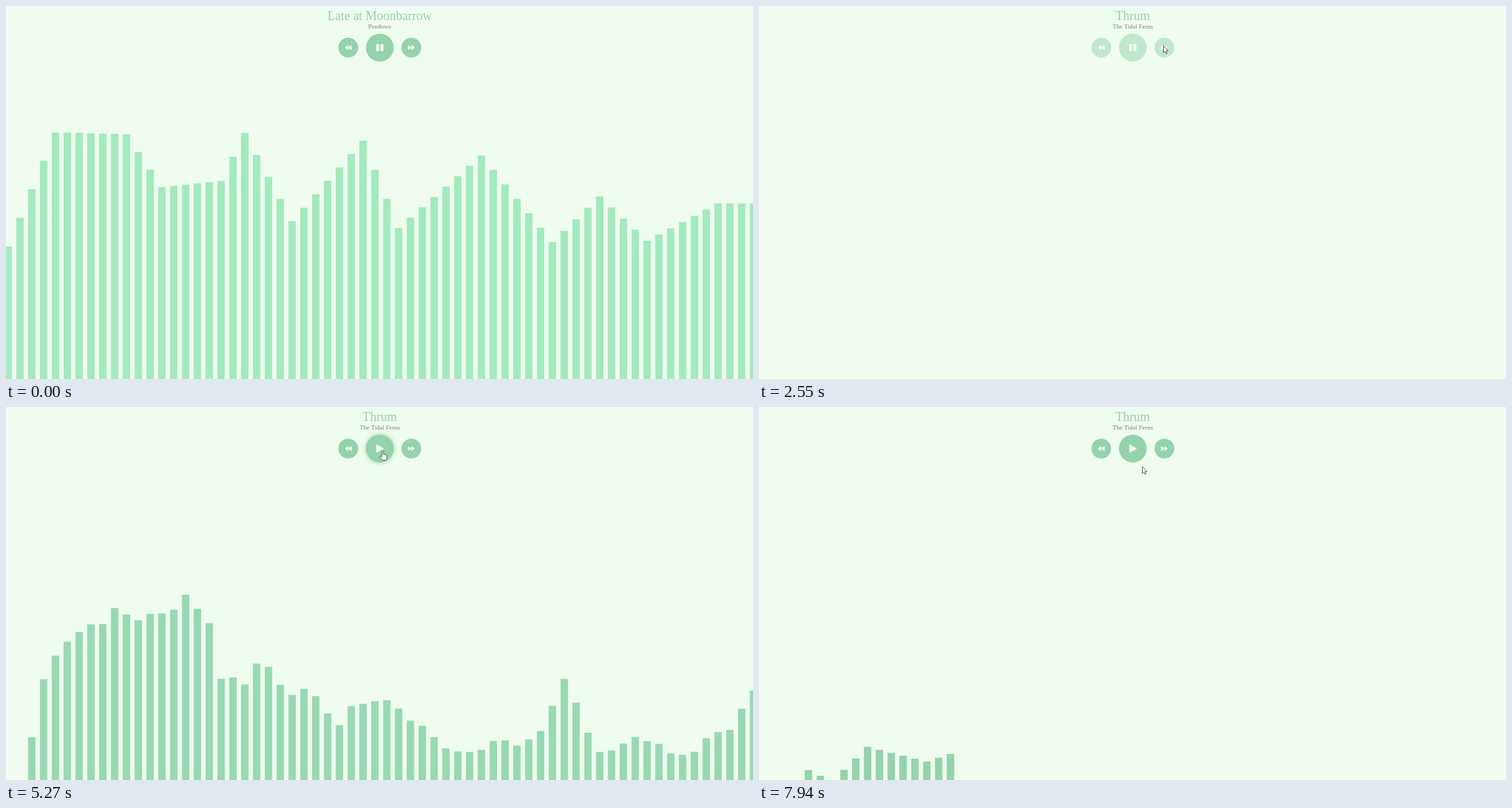
Recreate the animation shown at these times as an HTML page with a canvas. Size 1059 by 529 pixels, loop 8 s.

```html
<!DOCTYPE html>
<html lang="en">
<head>
<meta charset="utf-8">
<title>Music visualizer</title>
<style>
  html, body { margin: 0; width: 100%; height: 100%; overflow: hidden; background: #effcef; }
  canvas { display: block; width: 1059px; height: 529px; }
</style>
</head>
<body>
<canvas id="stage" width="1059" height="529"></canvas>
<script>
const W = 1059, H = 529, LOOP = 8000, BUTTON_Y = 59;
const PAPER = '#effcef', GREEN = '#94d3ac', INK = '#655c56';
const ctx = document.getElementById('stage').getContext('2d');

// Bursts of picture updates: first and last update in ms
const BURSTS = [[70, 850], [910, 1700], [1780, 2550], [3250, 4020], [4090, 4870],
  [4960, 5740], [5820, 6620], [6690, 7480], [7560, 7940]];

// Spectrum outlines: [bar, top] at the main peaks and dips
const opening = [[0, 341], [4, 179], [10, 182], [13, 257], [18, 248], [20, 180], [24, 305],
  [30, 191], [33, 315], [40, 212], [46, 335], [50, 270], [54, 333], [60, 280]];
const verse = [[0, 348], [4, 178], [7, 262], [10, 204], [18, 308], [27, 254],
  [34, 330], [40, 222], [43, 332], [48, 264], [57, 342], [60, 286]];
const chorus = [[0, 308], [3, 180], [6, 180], [11, 258], [14, 218], [17, 263], [21, 226],
  [25, 310], [33, 300], [35, 247], [41, 255], [42, 320], [60, 318]];
const strum = [[1, 455], [3, 302], [10, 195], [17, 182], [18, 284], [21, 262], [28, 380],
  [31, 313], [38, 405], [45, 390], [47, 300], [49, 368], [61, 395], [63, 311]];
const swell = [[1, 427], [3, 274], [7, 182], [9, 182], [11, 260], [15, 210], [20, 340],
  [27, 298], [36, 328], [42, 403], [47, 282], [50, 425], [53, 358], [56, 425], [63, 330]];
const close = [[1, 427], [4, 200], [6, 216], [9, 167], [14, 188], [16, 177],
  [17, 236], [42, 403], [47, 282], [63, 330]];

// [step, outline, colour strength]
const KEYS = [[0, opening, 1], [9, verse, .8], [24, chorus, 1], [25, chorus, 1],
  [34, strum, .45], [49, strum, .45], [73, swell, .7], [87, close, .6]];
// Sound stops at the first step and returns at the second
const STOPS = [[25, 34], [58, 63], [87, 99]];
const FALL = 45, TALLEST = 349.5;

// [step, x, y] of the pointer tip
const PATH = [[10, 604, 4], [11, 598, 12], [19, 573.5, 56.5], [34, 573.5, 56.5], [44, 529, 113],
  [49, 527, 119.5], [55, 527, 119.5], [58, 534, 62], [64, 534, 62], [71, 577, 61], [76, 577, 61],
  [82, 535, 62], [89, 535, 62], [94, 543.5, 84.5]];
const ARROW = new Path2D('M0 0V9.6L2.1 7.7L3.7 11.2L5.2 10.5L3.7 7.1H6.6Z');
const HAND = new Path2D('M-1 7V1.2Q0 -.4 1.1 1.2V5L3 5.4L4.6 6L6 7V10L4.8 13.5H-.8L-3.8 9Q-4 7.4 -2.6 7.6L-1 9Z');

const mix = (a, b, u) => a + (b - a) * u;
const clamp = (v, low, high) => Math.max(low, Math.min(high, v));
const hash = (a, b) => {
  const v = Math.sin(a * 12.9898 + b * 78.233) * 43758.5453;
  return v - Math.floor(v) - .5;
};

function stepAt(t) {
  let step = 0;
  BURSTS.forEach(([from, to], i) => {
    if (t < from) return;
    const n = i < 8 ? 10 : 5;
    step = 1 + i * 11 + Math.min(n, Math.floor((t - from) / (to - from) * n + .1));
  });
  return step;
}

// Neighbouring entries of a sorted list and the progress between them
function between(list, at) {
  let i = 0;
  while (i < list.length - 2 && at >= list[i + 1][0]) i++;
  const a = list[i], b = list[i + 1];
  return [a, b, clamp((at - a[0]) / (b[0] - a[0]), 0, 1)];
}

function topOf(outline, i) {
  const [a, b, u] = between(outline, i);
  return mix(a[1], b[1], u);
}

function liveHeight(i, step) {
  const [a, b, u] = between(KEYS, step);
  const swing = Math.min(1, Math.abs(step - a[0]) / 3, Math.abs(b[0] - step) / 3) * 20;
  const noise = hash(i, step) + hash(i + 1, step) + hash(Math.floor(i / 3), step + .5);
  return H - mix(topOf(a[1], i), topOf(b[1], i), u) + noise * swing;
}

function barHeight(i, step) {
  const stop = STOPS.filter(s => step >= s[0]).pop();
  let h;
  if (!stop) h = liveHeight(i, step);
  else {
    const [from, back] = stop;
    const falling = liveHeight(i, from) - FALL * (step - from);
    const gain = clamp((step - back + 1) / 3, 0, 1);
    h = Math.max(falling, gain * liveHeight(i, step));
  }
  return clamp(h, 0, TALLEST);
}

function drawBars(step) {
  const [a, b, u] = between(KEYS, step);
  const stop = STOPS.find(s => step >= s[0] && step < s[1]);
  const fade = stop ? Math.max(0, 1 - (step - stop[0]) / 4) : 1;
  const tint = mix(a[2], b[2], u) * fade;
  const rgb = [mix(148, 163, tint), mix(211, 234, tint), mix(172, 189, tint)].map(Math.round);
  ctx.fillStyle = `rgb(${rgb})`;
  for (let i = 0; i < 64; i++) {
    const h = barHeight(i, step);
    ctx.fillRect(i * 16.774 - 2.2, H - h, 10.5, h);
  }
}

function drawText(text, size, y, color, alpha = 1) {
  ctx.font = `${size}px "Liberation Serif", "Times New Roman", serif`;
  ctx.textAlign = 'center';
  ctx.fillStyle = color;
  ctx.globalAlpha = alpha;
  ctx.fillText(text, W / 2 + .3, y);
  ctx.globalAlpha = 1;
}

function triangle(x, w, h) {
  ctx.beginPath();
  ctx.moveTo(x, -h / 2);
  ctx.lineTo(x + w, 0);
  ctx.lineTo(x, h / 2);
  ctx.closePath();
  ctx.fill();
  ctx.stroke();
}

const ICONS = {
  back() { triangle(-.4, -4, 6); triangle(4.4, -4, 6); },
  next() { triangle(.4, 4, 6); triangle(-4.4, 4, 6); },
  play() { triangle(-4.6, 9.8, 11); },
  pause() {
    for (const x of [-5.2, .8]) {
      ctx.beginPath();
      ctx.roundRect(x, -5, 4.3, 10, .8);
      ctx.fill();
    }
  }
};

function drawButton(x, r, icon, hover, disabled) {
  ctx.save();
  ctx.translate(x, BUTTON_Y);
  ctx.fillStyle = GREEN;
  ctx.globalAlpha = disabled ? .5 : 1;
  if (hover) {
    ctx.shadowColor = GREEN;
    ctx.shadowBlur = 6;
  }
  ctx.beginPath();
  ctx.arc(0, 0, r, 0, Math.PI * 2);
  ctx.fill();
  ctx.shadowColor = 'transparent';
  ctx.globalAlpha = 1;
  ctx.fillStyle = ctx.strokeStyle = PAPER;
  ctx.lineWidth = 1;
  ctx.lineJoin = 'round';
  ICONS[icon]();
  ctx.restore();
}

function drawPointer(x, y, shape) {
  ctx.save();
  ctx.translate(x, y);
  ctx.fillStyle = '#fff';
  ctx.strokeStyle = '#333';
  ctx.lineWidth = .75;
  ctx.lineJoin = 'round';
  ctx.fill(shape);
  ctx.stroke(shape);
  ctx.restore();
}

function draw(t) {
  const step = stepAt(t);
  const second = step >= 25;
  const disabled = step >= 25 && step < 34;
  const waiting = step >= 24 && step < 34;
  const paused = step >= 87 || (step >= 58 && step < 63);
  const visible = step >= 10;
  const [a, b, u] = between(PATH, step);
  const x = mix(a[1], b[1], u), y = mix(a[2], b[2], u);
  const buttons = [[485.2, 14, 'back'], [530, 19.7, paused ? 'play' : 'pause'], [574.7, 14, 'next']];
  const over = buttons.findIndex(([bx, r]) => visible && Math.hypot(x - bx, y - BUTTON_Y) < r);

  ctx.fillStyle = PAPER;
  ctx.fillRect(0, 0, W, H);
  drawBars(step);
  drawText(second ? 'Thrum' : 'Late at Moonbarrow', 18, 20, GREEN);
  drawText(second ? 'The Tidal Ferns' : 'Pendows', 9, 32, INK, .8);
  buttons.forEach(([bx, r, icon], i) => drawButton(bx, r, icon, i === over && !disabled, disabled));
  if (visible) drawPointer(x, y, over >= 0 && !waiting ? HAND : ARROW);
}

const start = performance.now();
function tick() {
  draw((performance.now() - start) % LOOP);
  requestAnimationFrame(tick);
}
tick();
</script>
</body>
</html>
```
